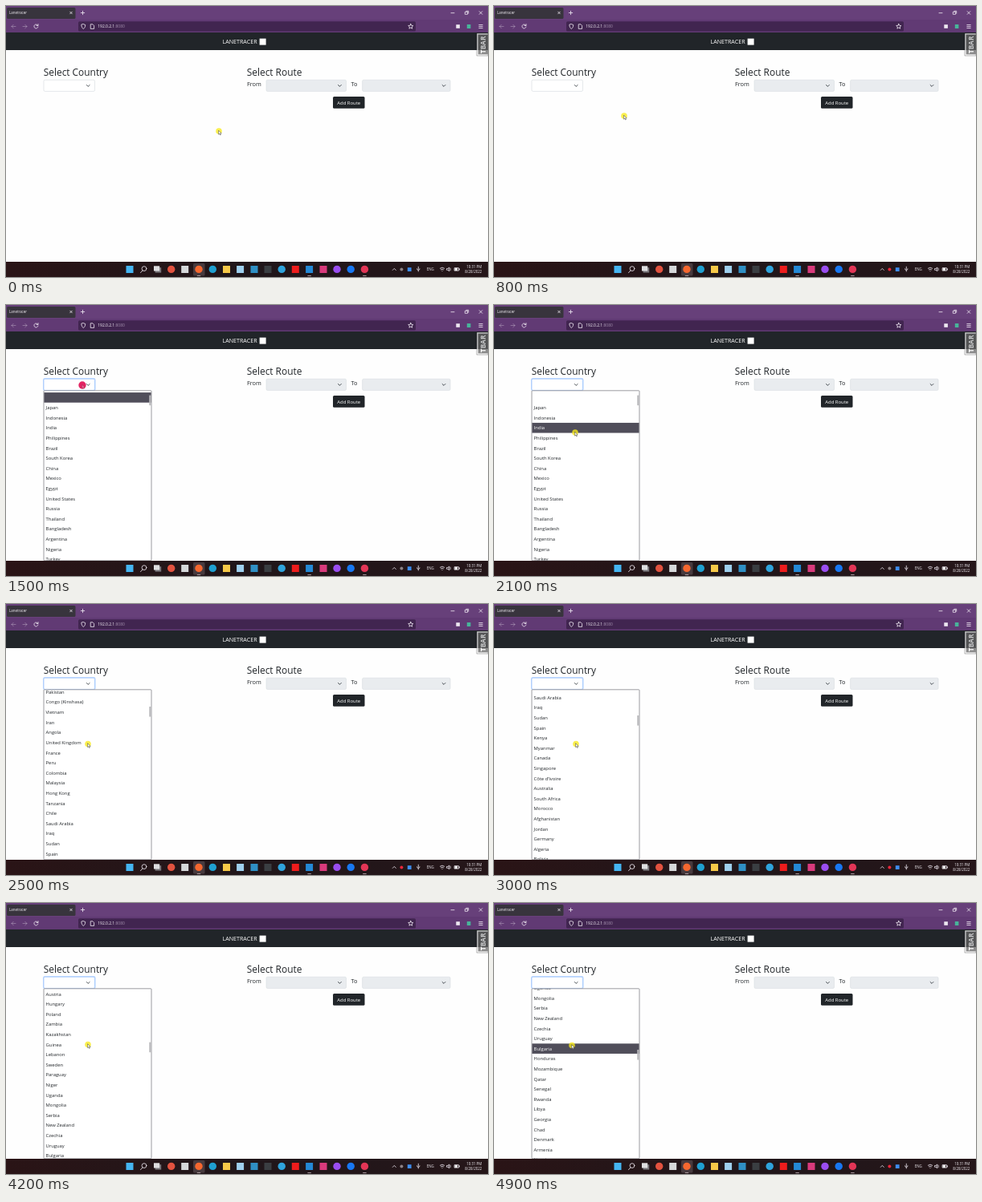
Animation, 600 px wide and 338 px high, one loop 5 s. Source, as an HTML page:

```html
<!DOCTYPE html>
<html lang="en">
<head>
<meta charset="utf-8">
<title>Lanetracer</title>
<style>
  html, body { margin: 0; width: 100%; height: 100%; overflow: hidden; background: #fefefe; }
  svg { display: block; width: 600px; height: 338px; }
  text { font-family: "Open Sans", "Noto Sans", sans-serif; fill: #212529; }
  .light { fill: #f4f1f6; }
  .line { fill: none; stroke: #f0eaf3; stroke-width: .8; stroke-linecap: round; stroke-linejoin: round; }
  .dim { opacity: .4; }
  .h { font-size: 11.9px; }
  .label { font-size: 7.3px; }
  .list { font-size: 5.85px; }
  .tray { font-size: 4.45px; }
  .off { fill: #e9ecef; stroke: #d3d8dd; stroke-width: .5; }
  .chev { fill: none; stroke: #343a40; stroke-width: .9; stroke-linecap: round; stroke-linejoin: round; }
</style>
</head>
<body>
<svg viewBox="0 0 600 338">
  <defs>
    <linearGradient id="bar">
      <stop offset="0" stop-color="#2a1416"/>
      <stop offset=".5" stop-color="#20161a"/>
      <stop offset="1" stop-color="#251619"/>
    </linearGradient>
    <clipPath id="clip"><rect x="47.4" y="107.2" width="133.2" height="211.2"/></clipPath>
    <path id="down" class="chev" d="M-1.9-.9 0 1 1.9-.9"/>
  </defs>
  <rect width="600" height="338" fill="#fefefe"/>

  <!-- browser -->
  <rect width="600" height="33" fill="#67407a"/>
  <rect y="17" width="600" height="16" fill="#613a74"/>
  <rect x="1" y="2" width="85.5" height="14" rx="1.5" fill="#38343d"/>
  <text class="light" x="4" y="10.3" font-size="4.4">Lanetracer</text>
  <g class="line">
    <path d="M79.7 7.2l2.6 2.6m0-2.6l-2.6 2.6M93.3 8.5h4.4m-2.2-2.2v4.4"/>
    <path d="M554 8.7h4M589.2 6.7l3.6 3.6m0-3.6l-3.6 3.6M571.7 7.4h2.9v2.9h-2.9zM572.8 6.3h2.9v2.9"/>
    <path class="dim" d="M12 25.5H7m2.2-2.2L7 25.5l2.2 2.2M21 25.5h5m-2.2-2.2l2.2 2.2-2.2 2.2"/>
    <path d="M39.7 24.3a2.5 2.5 0 1 0 .2 1.8M40 22.6v1.9h-1.9"/>
  </g>
  <rect x="90" y="19.3" width="420" height="12.2" rx="1.6" fill="#412550"/>
  <g class="line">
    <path d="M96.3 22.6l2.4.9c0 2.4-.8 4-2.4 5-1.6-1-2.4-2.6-2.4-5z"/>
    <path d="M105.6 22.8h2.4l1.6 1.6v4h-4z"/>
    <path d="M503.8 22.3l.9 2 2.2.2-1.7 1.5.5 2.2-1.9-1.2-1.9 1.2.5-2.2-1.7-1.5 2.2-.2z"/>
    <path d="M588.8 23.5h4.4m-4.4 2h4.4m-4.4 2h4.4"/>
  </g>
  <rect x="560.3" y="23.2" width="4.6" height="4.6" fill="#eee8f1"/>
  <rect x="573.8" y="23" width="4.6" height="5" fill="#48b49a"/>
  <text x="114.3" y="27.4" font-size="4.95" fill="#fff"><tspan fill="#fbf8fc">192.0.2.1</tspan><tspan fill="#a18eab">:8080</tspan></text>

  <!-- page -->
  <rect y="33" width="600" height="22" fill="#212529"/>
  <text x="269.6" y="47.4" font-size="7.1" style="fill:#fff">LANETRACER</text>
  <rect x="315.6" y="40.6" width="8" height="8" fill="#fff"/>
  <g opacity=".75">
    <rect x="586" y="34" width="14" height="28" fill="#fff" stroke="#111" stroke-width=".4"/>
    <rect x="587.6" y="35.6" width="12.4" height="24.8" fill="#666"/>
    <text transform="translate(596.8 59.2) rotate(-90)" font-size="8.4" font-weight="700" style="fill:#fff">TBAR</text>
  </g>
  <text class="h" x="46.8" y="87">Select Country</text>
  <text class="h" x="299.8" y="87">Select Route</text>
  <text class="label" x="300" y="100.3">From</text>
  <text class="label" x="429.6" y="100.3">To</text>
  <rect id="glow" x="46" y="91" width="65.6" height="16.4" rx="2.4" fill="#c3dafd"/>
  <rect id="box" x="47" y="92.2" width="63.5" height="14.2" rx="1.5" fill="#fff" stroke-width=".6"/>
  <rect class="off" x="324" y="92.2" width="99.5" height="14.2" rx="1.5"/>
  <rect class="off" x="443.6" y="92.2" width="109.5" height="14.2" rx="1.5"/>
  <use href="#down" x="102.2" y="99.4"/>
  <use href="#down" x="415.4" y="99.4"/>
  <use href="#down" x="545" y="99.4"/>
  <rect x="407" y="113" width="39.5" height="14.8" rx="1.5" fill="#212529"/>
  <text x="426.7" y="122.7" font-size="5.95" text-anchor="middle" style="fill:#fff">Add Route</text>

  <!-- open list -->
  <g id="menu">
    <rect x="47" y="106.8" width="134" height="212" rx=".8" fill="#fff" stroke="#85858a" stroke-width=".8"/>
    <g clip-path="url(#clip)">
      <g id="rows"><rect id="hot" x="47" width="134" height="12.6" fill="#504e5a"/></g>
    </g>
    <rect id="thumb" x="178.3" width="2.1" height="12.6" fill="#b9b9bc"/>
  </g>

  <!-- taskbar -->
  <rect y="319" width="600" height="19" fill="url(#bar)"/>
  <rect x="233" y="321" width="14.5" height="15.5" rx="1.5" fill="#473a3e"/>
  <g id="apps"></g>
  <g class="line">
    <circle cx="172" cy="327.6" r="2.9"/><path d="M170 330l-2.5 2.6"/>
    <path d="M481.3 329.4l2-2 2 2"/>
    <path d="M513.3 325.2v3.2m-1.7-.6a1.7 1.7 0 0 0 3.4 0m-1.7 1.8v1.4"/>
    <path d="M540.3 327.2q2.7-2.4 5.4 0M541.4 328.8q1.6-1.4 3.2 0M543 330.4v.1"/>
    <path d="M549 327.5h1l1.5-1.4v4.6l-1.5-1.4h-1zM553 326.8q1 1.6 0 3.2"/>
    <path d="M558.5 326.7h5v3.4h-5zM564.5 327.8v1.2"/>
  </g>
  <rect x="558.6" y="326.8" width="3.4" height="3.2" fill="#eee"/>
  <rect x="185.6" y="326.2" width="7.6" height="6.4" fill="#77757a"/>
  <rect x="184" y="324.3" width="7.2" height="6.2" fill="#dedee0"/>
  <circle id="rec" cx="492.4" cy="328.4" r="2"/>
  <rect x="499.8" y="326.2" width="4.8" height="4.8" fill="#3d8df0"/>
  <text class="tray light" x="523.8" y="330.2">ENG</text>
  <text class="tray light" x="592.3" y="326.9" text-anchor="end">10:31 PM</text>
  <text class="tray light" x="592.3" y="333.3" text-anchor="end">8/28/2022</text>

  <!-- pointer -->
  <g id="pointer">
    <circle id="spot" r="3.8"/>
    <path id="arrow" d="M-.4-.8v5l1.2-1 .8 1.8.8-.4-.8-1.7h1.6z" fill="#fff" stroke="#222" stroke-width=".45"/>
  </g>
</svg>
<script>
const $ = id => document.getElementById(id);
const make = (tag, attrs, parent) => {
  const el = document.createElementNS("http://www.w3.org/2000/svg", tag);
  for (const k in attrs) el.setAttribute(k, attrs[k]);
  return parent.appendChild(el);
};

// Taskbar apps: x, colour, round?
const apps = [
  [154, "#45b5f2"], [205.7, "#e2523f", 1], [222.7, "#d6d8da"], [240, "#f5672f", 1],
  [257.3, "#1f9fd0", 1], [274.5, "#f7c948"], [291.6, "#9fd0ee"], [309, "#2f8fc4"],
  [326, "#3a3e42"], [343.2, "#2fa3dc", 1], [360.3, "#ee1c1c"], [377.6, "#2489d6"],
  [395, "#d93a7c"], [412, "#9a4df0", 1], [429.2, "#1877f2", 1], [446.4, "#e23556", 1]
];
for (const [x, fill, round] of apps) {
  if (round) make("circle", { cx: x, cy: 328.4, r: 4.7, fill }, $("apps"));
  else make("rect", { x: x - 4.5, y: 324, width: 9, height: 9, fill }, $("apps"));
}
for (const x of [240, 377.6, 446.4])
  make("rect", { x: x - 2.2, y: 336, width: 4.4, height: .9, fill: "#b9a9ad" }, $("apps"));

const names = (",Japan,Indonesia,India,Philippines,Brazil,South Korea,China,Mexico,Egypt,United States," +
  "Russia,Thailand,Bangladesh,Argentina,Nigeria,Turkey,Pakistan,Congo (Kinshasa),Vietnam,Iran," +
  "Angola,United Kingdom,France,Peru,Colombia,Malaysia,Hong Kong,Tanzania,Chile,Saudi Arabia," +
  "Iraq,Sudan,Spain,Kenya,Myanmar,Canada,Singapore,Côte d’Ivoire,Australia,South Africa," +
  "Morocco,Afghanistan,Jordan,Germany,Algeria,Bolivia,Kuwait,Ukraine,Yemen,Taiwan," +
  "Ecuador,Madagascar,Dominican Republic,United Arab Emirates,Uzbekistan,Burkina Faso,Cameroon,Ghana,Azerbaijan,Zimbabwe," +
  "Cuba,Cambodia,Somalia,Mali,Belarus,Venezuela,Romania,Syria,Austria,Hungary," +
  "Poland,Zambia,Kazakhstan,Guinea,Lebanon,Sweden,Paraguay,Niger,Uganda,Mongolia," +
  "Serbia,New Zealand,Czechia,Uruguay,Bulgaria,Honduras,Mozambique,Qatar,Senegal,Rwanda," +
  "Libya,Georgia,Chad,Denmark,Armenia,Nepal").split(",");
const PITCH = 12.607, FIRST = 115.4, NOTCH = 10 * PITCH - .4;
const rows = names.map((name, i) => {
  const el = make("text", { class: "list", x: 49.6, y: FIRST + i * PITCH + 2.1 }, $("rows"));
  el.textContent = name;
  return el;
});

// Pointer path: time, x, y
const path = [
  [300, 265, 156], [500, 245, 152.5], [800, 162, 137], [900, 132, 128], [1100, 98, 104],
  [1200, 95, 100], [1600, 95, 100], [2100, 101, 159], [2300, 102, 173], [2500, 102, 174.5],
  [3400, 102, 174.5], [3600, 102, 176.5], [4600, 102, 176.5], [4900, 97, 177.5]
];
const wheel = [2250, 2400, 2750, 3050, 3250, 3650, 4050, 4250];

const clamp = v => Math.min(1, Math.max(0, v));
const easeOut = v => 1 - (1 - v) ** 2;

function pointerAt(t) {
  let [, x, y] = path[0];
  for (let i = 1; i < path.length; i++) {
    const [t0, x0, y0] = path[i - 1], [t1, x1, y1] = path[i];
    const k = clamp((t - t0) / (t1 - t0));
    if (k > 0) { x = x0 + (x1 - x0) * k; y = y0 + (y1 - y0) * k; }
  }
  return [x, y];
}
const scrollAt = t => wheel.reduce((sum, w) => sum + NOTCH * easeOut(clamp((t - w) / 200)), 0);

// The hovered row only changes while the pointer moves.
function hoverAt(t) {
  const at = t < 2300 ? t : t < 3500 ? 2300 : t < 4700 ? 3600 : t;
  return Math.max(0, Math.round((pointerAt(at)[1] - FIRST + scrollAt(at)) / PITCH));
}

function draw(ms) {
  const t = Math.floor(ms % 5000 / 100) * 100;
  const open = t >= 1400, click = t >= 1400 && t < 1600;
  const [x, y] = pointerAt(t), scroll = scrollAt(t), hot = hoverAt(t);

  $("pointer").setAttribute("transform", `translate(${x} ${y})`);
  $("spot").setAttribute("r", click ? 4.7 : 3.8);
  $("spot").setAttribute("fill", click ? "#e0175a" : "#f8ea1c");
  $("spot").setAttribute("fill-opacity", click ? .95 : .78);
  $("arrow").setAttribute("opacity", click ? .35 : 1);

  $("menu").style.display = $("glow").style.display = open ? "" : "none";
  $("box").setAttribute("stroke", open ? "#86b7fe" : "#d3d8dd");
  $("rows").setAttribute("transform", `translate(0 ${-scroll})`);
  $("hot").setAttribute("y", FIRST + hot * PITCH - 6.3);
  rows.forEach((el, i) => { el.style.fill = i === hot ? "#fff" : "#212529"; });
  $("thumb").setAttribute("y", 112.6 + scroll * .07);

  const lit = Math.floor((t + 500) / 1000) % 2 === 1;
  $("rec").setAttribute("fill", lit ? "#e8263a" : "#8d8285");
}

const start = performance.now();
function loop() {
  draw(performance.now() - start);
  requestAnimationFrame(loop);
}
loop();
</script>
</body>
</html>
```
